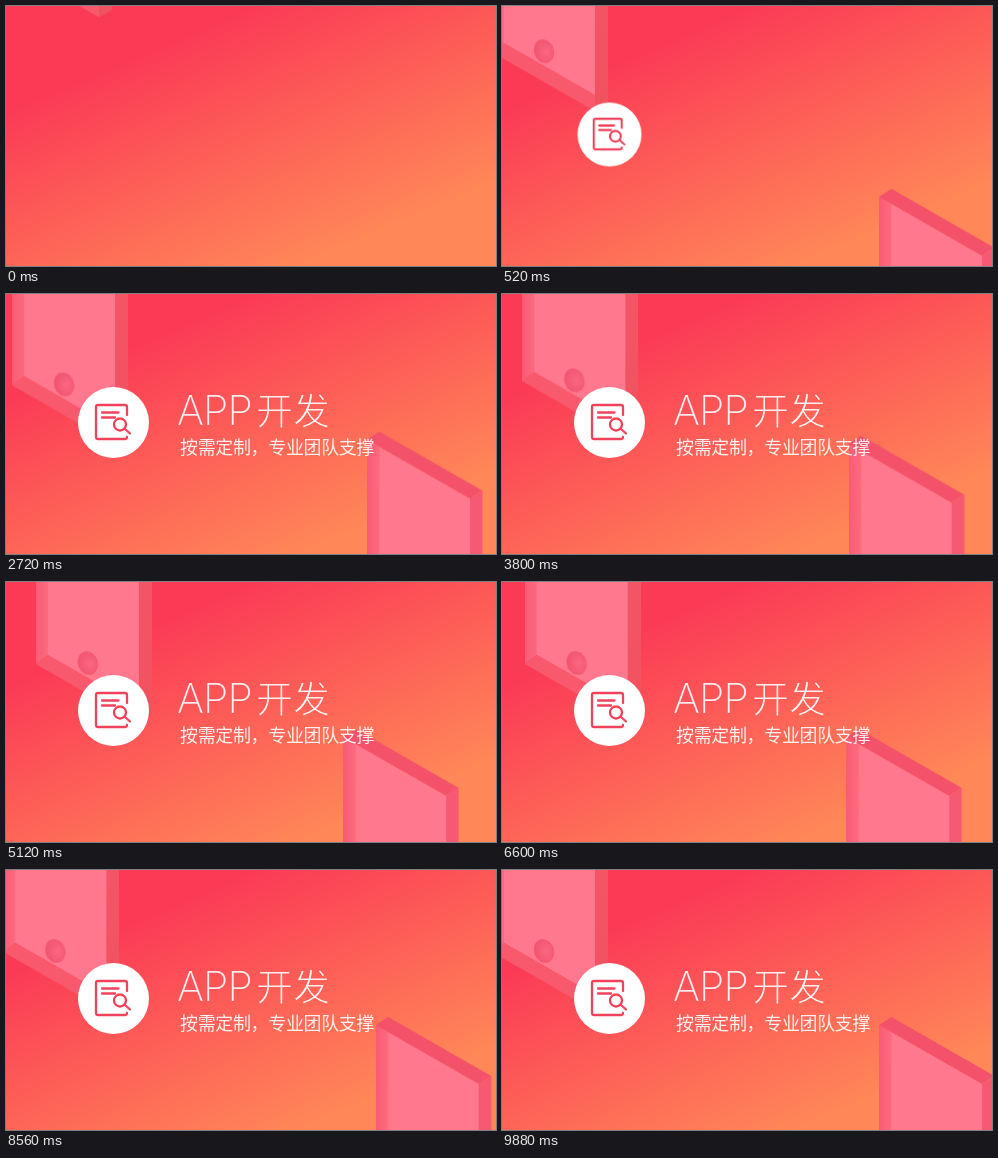
An HTML page that plays this animation: 490 by 260 pixels, repeating every 10000 ms.

```html
<!DOCTYPE html>
<html lang="zh-CN">
<head>
<meta charset="utf-8">
<title>APP开发</title>
<style>
  html, body { margin: 0; width: 100%; height: 100%; overflow: hidden; }
  body { background: linear-gradient(157deg, #fb3a56 22%, #ff8758 82%); }
  svg { display: block; width: 490px; height: 260px; }
  svg * { animation-duration: 10s; animation-iteration-count: infinite; }

  /* Both phones mirror each other: --dir flips the motion. */
  .upper { --dir: 1; }
  .lower { --dir: -1; }
  .drift { animation-name: drift; }
  .bob { animation-name: bob; }
  .badge { transform-origin: 107.5px 128.5px; animation-name: pop; }
  .title { animation-name: title; }
  .subtitle { animation-name: subtitle; }

  @keyframes drift {
    0%, 7% { transform: translateX(0); animation-timing-function: cubic-bezier(.37, 0, .63, 1); }
    53.2% { transform: translateX(calc(var(--dir) * 40px)); animation-timing-function: cubic-bezier(.37, 0, .63, 1); }
    98.4%, 100% { transform: translateX(0); }
  }
  @keyframes bob {
    0% { transform: translateY(calc(var(--dir) * -130px)); animation-timing-function: cubic-bezier(.165, .9, .4, 1); }
    25% { transform: translateY(calc(var(--dir) * 9.5px)); animation-timing-function: cubic-bezier(.37, 0, .63, 1); }
    53.2%, 100% { transform: translateY(0); }
  }
  @keyframes pop {
    0%, 2.5% { transform: scale(0); animation-timing-function: cubic-bezier(.25, .46, .45, .94); }
    6.5%, 100% { transform: scale(1); }
  }
  @keyframes title {
    0%, 6% { transform: translateX(400px); filter: url(#streak); animation-timing-function: cubic-bezier(.25, .46, .45, .94); }
    10%, 100% { transform: translateX(0); filter: none; }
  }
  @keyframes subtitle {
    0%, 12% { transform: translateX(400px); filter: url(#streak); animation-timing-function: cubic-bezier(.25, .46, .45, .94); }
    16%, 100% { transform: translateX(0); filter: none; }
  }

  text { fill: #fff; font-family: "Noto Sans CJK SC", "Noto Sans CJK", sans-serif; }
  .title { opacity: .9; }
  .latin { font: 200 41px Inter, sans-serif; font-optical-sizing: none; letter-spacing: -.8px; }
  .han { font-size: 37px; font-weight: 100; }
  .subtitle { font-size: 18px; letter-spacing: -.35px; opacity: .9; }
  .comma { font-family: "Noto Sans CJK TC", "Noto Sans CJK", sans-serif; }
  .icon { fill: none; stroke: #ef435b; stroke-width: 2.3; stroke-linecap: round; stroke-linejoin: round; }
</style>
</head>
<body>
<svg viewBox="0 0 490 260">
  <defs>
    <filter id="streak" filterUnits="userSpaceOnUse" x="60" y="90" width="430" height="90" color-interpolation-filters="sRGB">
      <feGaussianBlur stdDeviation="18 0"/>
    </filter>
    <linearGradient id="bevel">
      <stop offset="0" stop-color="#f95c74"/>
      <stop offset="1" stop-color="#fc6a80"/>
    </linearGradient>
    <linearGradient id="side" x2="0" y2="1">
      <stop offset="0" stop-color="#f9596f"/>
      <stop offset="1" stop-color="#f0525f"/>
    </linearGradient>
    <radialGradient id="button" cx=".6" cy=".55" r=".6">
      <stop offset="0" stop-color="#fb6781"/>
      <stop offset="1" stop-color="#f2546f"/>
    </radialGradient>
    <text id="han" class="han" x="250" y="131">开发</text>
    <!-- A black outline trims the glyphs to a lighter weight. -->
    <mask id="thin" maskUnits="userSpaceOnUse" x="240" y="90" width="100" height="60">
      <use href="#han" stroke="#000" stroke-width="1.1"/>
    </mask>
  </defs>

  <g class="upper drift"><g class="upper bob">
    <path fill="#ff788d" d="M2-160V73L93 125V-160Z"/>
    <path fill="url(#bevel)" d="M-10-160V82L2 73V-160Z"/>
    <path fill="#f9596d" d="M-10 82L2 73L93 125V141Z"/>
    <path fill="url(#side)" d="M93-160V141L106 134V-160Z"/>
    <ellipse cx="42" cy="81" rx="10" ry="12" fill="url(#button)" transform="rotate(-18 42 81)"/>
  </g></g>

  <g class="lower drift"><g class="lower bob">
    <path fill="#ff788d" d="M389.5 162L480 214V420H389.5Z"/>
    <path fill="url(#bevel)" d="M377 155L389.5 162V420H377Z"/>
    <path fill="#f4526a" d="M377 155L389.5 147L492.5 206L480 214Z"/>
    <path fill="#f55a72" d="M480 214L492.5 206V420H480Z"/>
  </g></g>

  <g class="badge">
    <circle cx="107.5" cy="128.5" r="35.5" fill="#fff"/>
    <g class="icon">
      <path d="M121 121V113Q121 111 119 111H92Q90 111 90 113V143Q90 145 92 145H119Q121 145 121 143"/>
      <path d="M96 118.5H112.5M96 123.5H109"/>
      <circle cx="114" cy="130.5" r="6"/>
      <path d="M118.5 134.5L124 139.5"/>
    </g>
  </g>

  <g class="title">
    <text class="latin" x="171" y="131">APP</text>
    <use href="#han" mask="url(#thin)"/>
  </g>
  <text class="subtitle" x="174" y="159.5">按需定制<tspan class="comma">，</tspan>专业团队支撑</text>
</svg>
</body>
</html>
```
